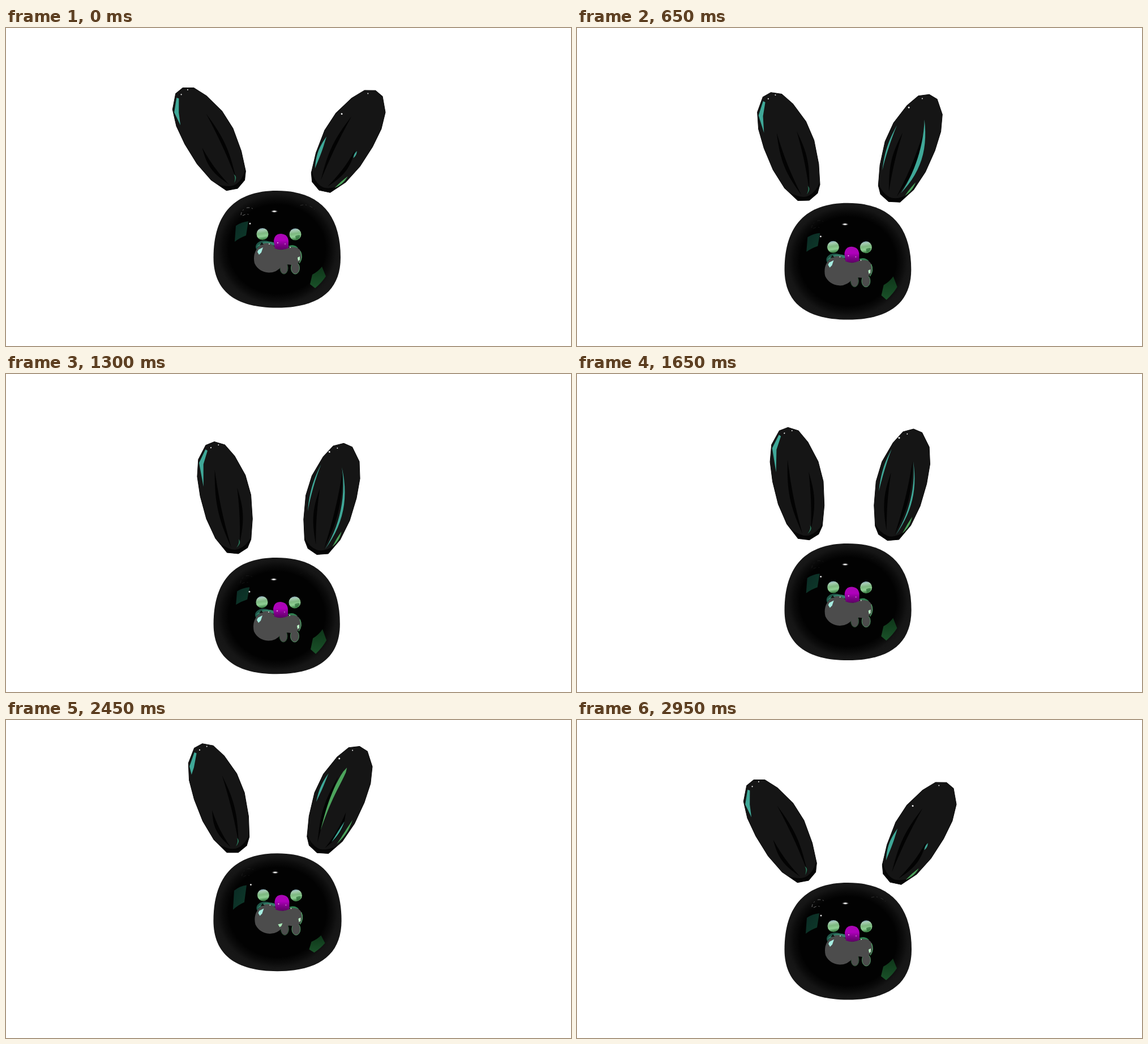
Write an HTML page that moves like this. It is 998x561 px and loops after 3000 ms.

```html
<!DOCTYPE html>
<html lang="en">
<head>
<meta charset="utf-8">
<title>Black bunny</title>
<style>
html, body { margin: 0; width: 100%; height: 100%; overflow: hidden; background: #fff; }
svg { display: block; width: 100%; height: 100%; }
</style>
</head>
<body>
<svg viewBox="0 0 998 561" xmlns="http://www.w3.org/2000/svg">
  <defs>
    <radialGradient id="skin">
      <stop offset=".76" stop-color="#020202"/>
      <stop offset=".86" stop-color="#0b0b0b"/>
      <stop offset=".94" stop-color="#151515"/>
      <stop offset="1" stop-color="#171717"/>
    </radialGradient>
    <linearGradient id="eye" x2=".15" y2="1">
      <stop offset="0" stop-color="#6f8fb4"/>
      <stop offset=".22" stop-color="#a8cdb5"/>
      <stop offset=".5" stop-color="#7db880"/>
      <stop offset=".75" stop-color="#8fd094"/>
      <stop offset="1" stop-color="#3f8248"/>
    </linearGradient>
    <linearGradient id="nose" x2="0" y2="1">
      <stop offset="0" stop-color="#a808b2"/>
      <stop offset=".4" stop-color="#b000bc"/>
      <stop offset=".68" stop-color="#84008e"/>
      <stop offset="1" stop-color="#5c0064"/>
    </linearGradient>
    <radialGradient id="glint">
      <stop offset="0" stop-color="#fff"/>
      <stop offset=".35" stop-color="#ddd"/>
      <stop offset="1" stop-color="#000" stop-opacity="0"/>
    </radialGradient>
    <linearGradient id="tealPane" x2="1" y2="1">
      <stop offset="0" stop-color="#0a2a24"/>
      <stop offset="1" stop-color="#0e3a2a"/>
    </linearGradient>
    <linearGradient id="greenPane" x2="0" y2="1">
      <stop offset="0" stop-color="#0e3519"/>
      <stop offset="1" stop-color="#1a5229"/>
    </linearGradient>
  </defs>
  <g id="leftEar"></g>
  <g id="rightEar"></g>
  <g id="skull">
    <path fill="url(#skin)" transform="translate(-478.500 -390)" d="M478.500 287C552.500 287 591 327 591 405C591 463.500 552.500 493.500 478.500 493.500C404.500 493.500 366.500 463.500 366.500 405C366.500 327 404.500 287 478.500 287Z"/>
  </g>
  <path id="leftPane" fill="url(#tealPane)" d="M-10 -10Q0 -17 12 -18L8 7Q-3 11 -12 18Z"/>
  <path id="rightPane" fill="url(#greenPane)" d="M-10 -5Q0 -10 7 -19L14 -2Q7 9 -5 19L-14 12Z"/>
  <g id="face">
    <g id="reflection" fill="none" stroke="#777" stroke-width="1" stroke-dasharray="5 4 2 6">
      <path d="M415 330Q416 320 426 317Q436 316 439 323M418 331Q426 326 432 331"/>
      <path d="M520 313Q533 309 545 320" stroke="#333"/>
    </g>
    <ellipse cx="474" cy="323.500" rx="7" ry="2.600" fill="url(#glint)"/>
    <circle cx="431" cy="345" r="1.500" fill="#ddd"/>
    <circle cx="453" cy="363.500" r="10.500" fill="url(#eye)"/>
    <circle cx="511" cy="364" r="10.500" fill="url(#eye)"/>
    <path d="M511 367Q517 364 520 366Q518 373 512 372Z" fill="#2b6b38" opacity=".7"/>
    <ellipse cx="456" cy="386" rx="15" ry="11" fill="#1f5548"/>
    <path d="M442 387Q450 375 468 377L480 380L474 384Q455 379 442 387Z" fill="#347f68"/>
    <path d="M498 385Q508 380 516 388L508 390Z" fill="#2f8050"/>
    <g fill="#4c4c4c">
      <ellipse cx="491" cy="423.500" rx="7" ry="10.500" stroke="#25502f"/>
      <ellipse cx="511" cy="423.500" rx="7.500" ry="10.500" stroke="#4f9462"/>
      <path d="M453 381Q464 377 472 384L488 391Q502 384 515 388Q523 393 522.500 404Q520 417 504 418Q496 416 487 420Q478 432 464 431.500Q446 430 439 415Q434 393 453 381Z"/>
    </g>
    <path d="M520 394Q525 405 518 415" fill="none" stroke="#4d9b63" stroke-width="1.500"/>
    <path d="M446 391L454 387L451 396L447 400L444 395Z" fill="#a6ece0"/>
    <path d="M515 405L519 403L519 409L516 411Z" fill="#b9f3c4"/>
    <path id="toothGlint" d="M479 415L487 413L485 418L482 420Z" fill="#a9e8b6"/>
    <path d="M448 383L452 378L455 382Z" fill="#111"/>
    <path d="M473 376Q474 363 486 363Q498 364 499 376L499 388Q488 394 475 389Z" fill="url(#nose)"/>
    <g fill="#f2c8f4"><circle cx="480" cy="379" r="1"/><circle cx="493" cy="381" r=".8"/></g>
    <g fill="#ddd"><circle cx="465" cy="381" r="1"/><circle cx="502" cy="387" r="1"/></g>
  </g>
</svg>
<script>
const LOOP = 3000, STEP = 50;
const TEAL = '#3fa898', GREEN = '#4ca45c', CREASE = '#030303';
const EAR = 'M2 -101L19 -92L32 -69L43.500 -32L46 4L40 46L30 81L21 94L3 101L-16 95L-31 66L-39.500 29L-42 -12L-40 -47L-32 -76L-14 -98Z';
const EAR_BASE = 'M32 76L21 94L3 101L-16 95L-25 77Q-8 95 5 93Q20 91 32 76Z';

const keyTimes = [0, 400, 850, 1650, 2050, 2450, 2950];
const keys = {
  tilt:      [28.3, 24.7, 15.5, 10.5, 12.4, 18, 28.3],
  outerTop:  [8, -4, -47, -45, -1, 16, 8],
  innerTop:  [-41, -32, -15, -17, -34, -37, -41],
  sliverEnd: [-45, -44, -33, -27, -43, -55, -45],
  rimTop:    [12, -9, -44, -58, -49, -37, 12],
  rimEnd:    [71, 63, 45, 20, 8, 18, 71],
  rimWidth:  [6, 4, 2.5, 3, 3.5, 4, 6],
  glowTop:   [8, -47, -57, -45, 44, 32, 8],
  glowEnd:   [22, 68, 84, 88, 81, 74, 22],
  glowWidth: [3, 8, 6, 3, 2.5, 3, 3],
  edgeTop:   [55, 55, 51, 51, 42, 24, 55],
  edgeEnd:   [84, 84, 80, 83, 84, 74, 84],
  leafEnd:   [-45, -45, -45, -45, -31, 62, -45],
  leafWidth: [0, 0, 0, 0, 5, 6.5, 0],
  sparkY:    [-36, -52, -76, -80, -75, -68, -36]
};

const $ = id => document.getElementById(id);
const smooth = u => u * u * (3 - 2 * u);
const clamp = (v, low, high) => Math.max(low, Math.min(high, v));

// Cubic Hermite interpolation, resting at both ends of the loop.
function keyed(v, t) {
  const T = keyTimes, last = T.length - 1;
  let i = 0;
  while (i < last - 1 && t > T[i + 1]) i++;
  const slope = k => k === 0 || k === last ? 0 : (v[k + 1] - v[k - 1]) / (T[k + 1] - T[k - 1]);
  const span = T[i + 1] - T[i], u = (t - T[i]) / span, e = smooth(u);
  return v[i] * (1 - e) + v[i + 1] * e +
    span * u * (1 - u) * ((1 - u) * slope(i) - u * slope(i + 1));
}

function bounce(t) {
  if (t < 1200) return 38 * smooth(t / 1200);
  if (t < 2450) return 38 - 89 * smooth((t - 1200) / 1250);
  return -51 + 51 * smooth((t - 2450) / 500);
}

// A pointed streak whose centre line is x = line(y); a skew below 1 widens its top.
function streak(line, top, end, width, fill, skew = 1) {
  if (width < .3 || end <= top) return '';
  const n = 14, near = [], far = [];
  for (let i = 0; i <= n; i++) {
    const u = i / n, y = top + (end - top) * u;
    const x = line(y, u), half = width / 2 * Math.sin(Math.PI * u ** skew);
    near.push(`${(x - half).toFixed(2)} ${y.toFixed(2)}`);
    far.unshift(`${(x + half).toFixed(2)} ${y.toFixed(2)}`);
  }
  return `<path fill="${fill}" d="M${near.concat(far).join('L')}Z"/>`;
}

const bow = (x0, x1, bulge) => (y, u) => x0 + (x1 - x0) * u + bulge * Math.sin(Math.PI * u);
const arc = (rx, ry) => y => rx * Math.sqrt(1 - (y / ry) ** 2);
const dot = (x, y, r) => `<circle cx="${x}" cy="${y}" r="${r}" fill="#eee"/>`;

const earShape = inside =>
  `<path d="${EAR}" fill="#151515" stroke="#0a0a0a"/>` +
  `<path d="${EAR_BASE}" fill="#050505"/>` + inside;

const creases = p =>
  streak(bow(-18 - Math.min(0, p.outerTop) * .2, -7, -6), p.outerTop, 88, 6.5, CREASE) +
  streak(bow(17.5 + (p.innerTop + 38) * .3, 9, 5), p.innerTop, 84, 6, CREASE);

function leftEar(p) {
  const sliver = `<path fill="${TEAL}" d="M-16 -91L-13 -88L-25 -66L-33 ${p.sliverEnd}L-32 -70Z"/>`;
  return earShape(creases(p) + sliver +
    streak(bow(9, 2, 3), 76, 90, 2, '#2c7a5c') +
    dot(-6, -92, 1.1) + dot(8, -94, 1));
}

function rightEar(p) {
  const glowLine = y => -22 + ((y - 20) / 68) ** 2 * 13;
  return earShape(
    creases(p) +
    streak(glowLine, p.glowTop, p.glowEnd, p.glowWidth, TEAL) +
    streak(bow(9, 12, 4), -58, p.leafEnd, p.leafWidth, GREEN, .5) +
    streak(arc(38, 105), p.rimTop, p.rimEnd, p.rimWidth, TEAL) +
    streak(arc(-35, 100), p.edgeTop, p.edgeEnd, 3.5, GREEN) +
    dot(arc(36, 105)(p.sparkY), p.sparkY, 1.5) + dot(11, -90, 1));
}

function place(id, x, y, rest = '') {
  $(id).setAttribute('transform', `translate(${x.toFixed(2)} ${y.toFixed(2)}) ${rest}`);
}

function draw(t) {
  const p = {};
  for (const name in keys) p[name] = keyed(keys[name], t);
  const dy = bounce(t), spread = p.tilt - 10.5, earY = dy * .97;

  place('leftEar', 389 - spread * 1.713, 182.5 + earY + spread * .73, `rotate(${-p.tilt})`);
  place('rightEar', 574.5 + spread * 1.713 - dy * .04, 184.5 + earY + spread * .84,
    `scale(-1 1) rotate(${-13.2 - spread * .9 + dy * .03})`);
  $('leftEar').innerHTML = leftEar(p);
  $('rightEar').innerHTML = rightEar(p);

  place('skull', 478.5 - dy * .015, 390 + dy, `scale(${1 - dy * .00015})`);
  place('face', -dy * .028, dy * 1.07);
  place('leftPane', 416 + dy * .06, 359 + dy * .9, `scale(1 ${1 - dy * .004})`);
  place('rightPane', 551 + dy * .03, 440 + dy * .88, `scale(1 ${1 + dy * .004})`);
  $('reflection').setAttribute('opacity', clamp((p.tilt - 24) / 4, .15, 1));
  $('toothGlint').setAttribute('opacity', clamp(-dy / 25, 0, 1));
}

let shown = -1;
function tick(now) {
  const t = Math.floor(now % LOOP / STEP) * STEP;
  if (t !== shown) draw(shown = t);
  requestAnimationFrame(tick);
}
draw(0);
requestAnimationFrame(tick);
</script>
</body>
</html>
```
